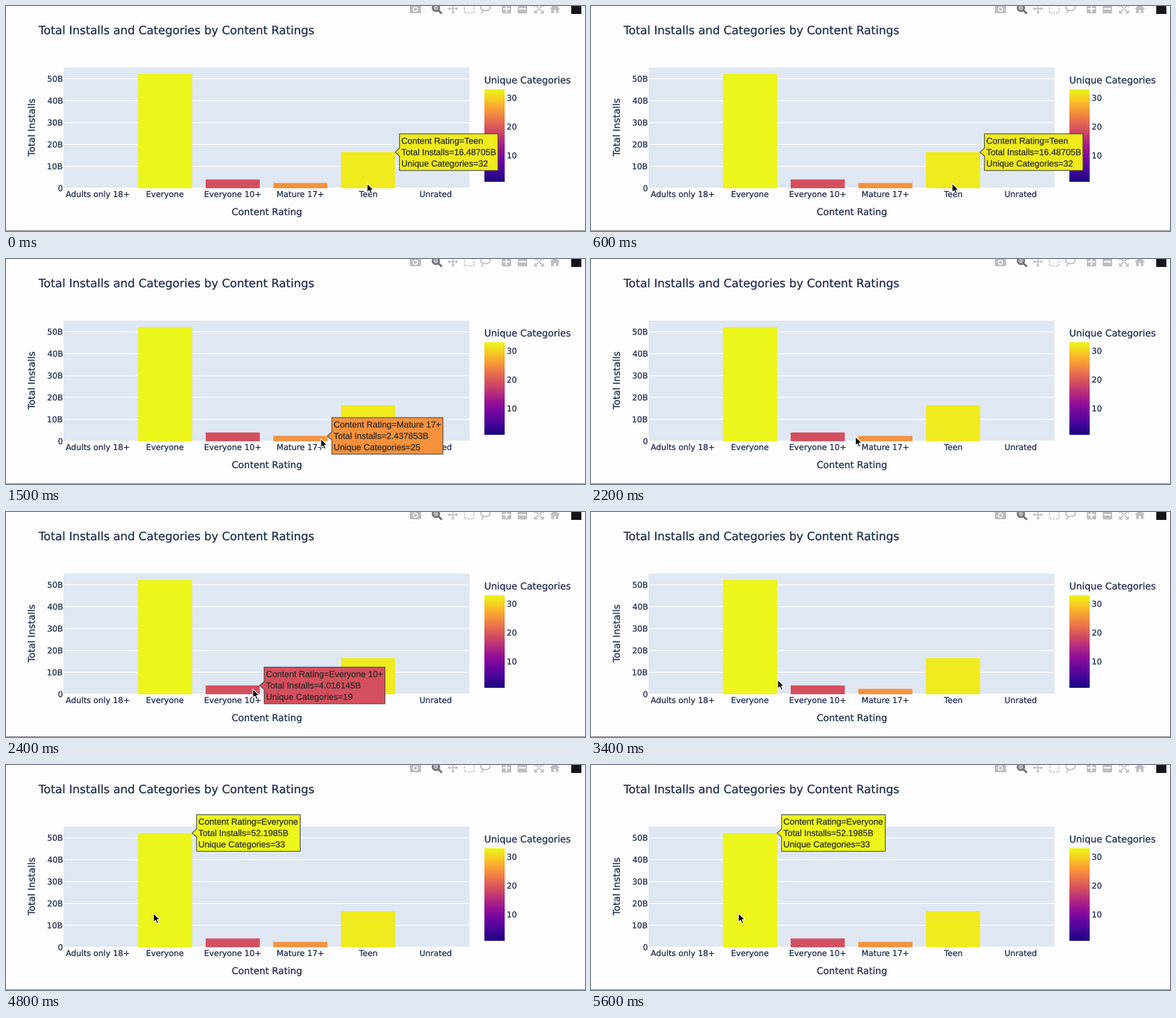
Write a matplotlib script that moves like this. It is 800 px wide and 311 px high and loops after 5.7 s.

```python
import matplotlib.pyplot as plt
import numpy as np
from matplotlib.animation import FuncAnimation
from matplotlib.colors import LinearSegmentedColormap
from matplotlib.patches import (Circle, Ellipse, FancyBboxPatch, PathPatch,
                                Polygon, Rectangle)
from matplotlib.textpath import TextPath
from matplotlib.transforms import Affine2D

W, H, DPI = 800, 311, 64
PT = 72 / DPI  # points per pixel
STEP, FRAMES = 100, 57

BG, PLOT, INK = "#fdfcff", "#dfe7f2", "#1c2848"
ICON, ICON_ON = "#bebec2", "#6f6f74"
X0, X1, Y_TOP, Y_ZERO = 79.6, 640.4, 85.2, 251.9
PX_PER_B = 3.025
SANS, ARIAL = "DejaVu Sans", "Liberation Sans"

plasma = LinearSegmentedColormap.from_list("plasma10", [
    "#1b0580", "#440698", "#6b07a0", "#930f98", "#b52c7f",
    "#d24c61", "#e9704e", "#f89a38", "#f8c822", "#ecf61b"])

# label, installs in billions, text of the value, unique categories
RATINGS = [
    ("Adults only 18+", 0, "", 1),
    ("Everyone", 52.1985, "52.1985B", 33),
    ("Everyone 10+", 4.016145, "4.016145B", 19),
    ("Mature 17+", 2.437853, "2.437853B", 25),
    ("Teen", 16.48705, "16.48705B", 32),
    ("Unrated", 0, "", 1),
]

# pointer stops: ms, x, y
PATH = [(0, 499, 245.4), (700, 499, 245.4), (1200, 472, 240), (1500, 435, 248.5),
        (1800, 435, 248.5), (2400, 341, 244.7), (2800, 341, 244.7),
        (3400, 258, 232), (3900, 203.8, 205), (5700, 203.8, 205)]

fig = plt.figure(figsize=(W / DPI, H / DPI), dpi=DPI, facecolor=BG)
ax = fig.add_axes([0, 0, 1, 1])


def rect(x0, y0, x1, y1, color, z=1):
    return ax.add_patch(Rectangle((x0, y0), x1 - x0, y1 - y0, fc=color, lw=0,
                                  zorder=z, snap=False))


def poly(points, color, z=1, **kw):
    kw.setdefault("lw", 0)
    return ax.add_patch(Polygon(points, closed=True, fc=color, zorder=z, **kw))


def stroke(xs, ys, color=ICON, width=1.5, z=2, **kw):
    return ax.plot(xs, ys, color=color, lw=width * PT, zorder=z, snap=False, **kw)[0]


def label(x, y, s, size, align=0, angle=0, family=SANS, color=INK, z=4):
    """Text with its baseline at y; align 0, 0.5, 1 is left, centre, right.
    Returns the artist and its width in pixels."""
    path = TextPath((0, 0), s, size=size, prop={"family": family})
    box = path.get_extents()
    width = box.x1 + box.x0
    place = Affine2D().translate(-align * width, 0).scale(1, -1).rotate_deg(-angle).translate(x, y)
    artist = ax.add_patch(PathPatch(place.transform_path(path), fc=color, ec=color,
                                    lw=0.22 * PT, zorder=z, snap=False))
    return artist, width


def level(billions):
    return Y_ZERO - billions * PX_PER_B


def shade(categories):
    return plasma((categories - 1) / 32)


def draw_chart():
    rect(X0, Y_TOP, X1, Y_ZERO, PLOT)
    for b in range(0, 60, 10):
        y = level(b)
        stroke([X0, X1], [y, y], "white", 1.7 if b == 0 else 1.1, solid_capstyle="butt")
        label(78.7, y + 4, f"{b}B" if b else "0", 11.1, 1)

    slot = (X1 - X0) / len(RATINGS)
    bars = []
    for i, (name, installs, value, cats) in enumerate(RATINGS):
        cx = X0 + slot * (i + 0.5)
        label(cx, 264, name, 11.1, 0.5)
        if installs:
            left, right, top = cx - 0.4 * slot, cx + 0.4 * slot, level(installs)
            rect(left, top, right, Y_ZERO, shade(cats), z=3)
            bars.append((left, right, top, name, value, cats))

    label(45, 39, "Total Installs and Categories by Content Ratings", 15.88)
    label(360.3, 289, "Content Rating", 12.95, 0.5)
    label(39.8, 168.2, "Total Installs", 12.95, 0.5, angle=90)

    label(660.8, 107, "Unique Categories", 12.95)
    ramp = np.linspace(1, 0, 256)[:, None]
    ax.imshow(ramp, cmap=plasma, extent=(661, 689, 243, 115), aspect="auto", zorder=2)
    for n in (10, 20, 30):
        label(691.8, 115 + (33 - n) * 127.5 / 32 + 4, str(n), 11.1)
    rect(0, 310, W, 311, "#8e8c90")
    return bars


def draw_toolbar():
    # camera
    rect(558, -1, 573.5, 10, ICON)
    ax.add_patch(Circle((565.7, 4.5), 3.6, fc=BG, lw=0, zorder=2))
    ax.add_patch(Circle((565.7, 4.5), 2.2, fc=ICON, lw=0, zorder=3))
    # magnifier
    ax.add_patch(Circle((594, 2.6), 4.6, fc="#b4b4b8", ec=ICON_ON, lw=2.2 * PT, zorder=2))
    stroke([597.6, 601.2], [6.2, 9.6], ICON_ON, 2.8)
    # pan
    cx, cy = 617.5, 3.7
    stroke([cx - 5, cx + 5], [cy, cy])
    stroke([cx, cx], [cy - 5, cy + 5])
    for dx, dy in ((1, 0), (-1, 0), (0, 1), (0, -1)):
        base = np.array([cx + 4.2 * dx, cy + 4.2 * dy])
        side = np.array([-dy, dx]) * 2.6
        poly([base + side, base - side, (cx + 7.2 * dx, cy + 7.2 * dy)], ICON, 2)
    # box select
    stroke([633.5, 646.5, 646.5, 633.5, 633.5], [-2.5, -2.5, 9.5, 9.5, -2.5],
           width=1.5, dashes=(1.6, 1.1), dash_capstyle="butt")
    # lasso
    ax.add_patch(Ellipse((662.5, 2.2), 13, 8.5, fc="none", ec=ICON, lw=1.6 * PT, zorder=2))
    stroke([657.5, 659.5, 658, 657], [4.7, 6.7, 8.5, 10.2])
    # zoom in and out
    for cx in (691.5, 713.5):
        ax.add_patch(FancyBboxPatch((cx - 5.5, -1.7), 11, 11, fc=ICON, lw=0, zorder=2,
                                    boxstyle="round,pad=1,rounding_size=1.5"))
        stroke([cx - 4, cx + 4], [3.8, 3.8], BG, 2, 3)
    stroke([691.5, 691.5], [-0.2, 7.8], BG, 2, 3)
    # autoscale
    cx, cy = 736.5, 3.7
    for sx in (-1, 1):
        for sy in (-1, 1):
            stroke([cx + 1.2 * sx, cx + 5 * sx], [cy + 1.2 * sy, cy + 5 * sy], width=1.6)
            stroke([cx + 2.8 * sx, cx + 6 * sx, cx + 6 * sx],
                   [cy + 6 * sy, cy + 6 * sy, cy + 2.8 * sy], width=1.5)
    # home
    poly([(751, 4), (758.3, -2.7), (765.6, 4)], ICON, 2)
    rect(753.2, 3.6, 763.4, 9.8, ICON, 2)
    rect(757, 5.6, 759.8, 9.8, BG, 3)
    # plain badge
    rect(781, -3, 795, 11, "#17131d", 2)


def make_tip(right, top, name, value, cats):
    """Hover label whose arrow points at the top right corner of a bar."""
    left, half, notch = right + 6.1, 25.3, 5.5
    lines = [f"Content Rating={name}", f"Total Installs={value}", f"Unique Categories={cats}"]
    texts, widths = zip(*(label(left + 2.5, top + (i - 1) * 15.7 + 4.1, s, 12,
                                family=ARIAL, color="#2b2b27", z=9)
                          for i, s in enumerate(lines)))
    end = left + 5.4 + max(widths)
    box = poly([(right, top), (left, top - notch), (left, top - half), (end, top - half),
                (end, top + half), (left, top + half), (left, top + notch)],
               shade(cats), 8, ec="#444444", lw=PT, joinstyle="miter")
    return [box, *texts]


ARROW = np.array([(0, 0), (0, 12.2), (2.8, 9.6), (4.9, 14.2), (7, 13.2), (5, 8.8), (8.8, 8.6)])

bars = draw_chart()
draw_toolbar()
tips = [make_tip(*bar[1:]) for bar in bars]
pointer = poly(ARROW, "black", 12, ec="white", lw=PT)

ax.set_xlim(0, W)
ax.set_ylim(H, 0)
ax.set_axis_off()


def pointer_at(t):
    for (t0, *p0), (t1, *p1) in zip(PATH, PATH[1:]):
        if t <= t1:
            u = (t - t0) / (t1 - t0)
            u = u * u * (3 - 2 * u)
            return np.array(p0) + (np.array(p1) - np.array(p0)) * u


def update(i):
    x, y = pos = pointer_at(i * STEP)
    pointer.set_xy(ARROW + pos)
    for (left, right, top, *_), tip in zip(bars, tips):
        hit = left <= x < right and top <= y <= Y_ZERO
        for artist in tip:
            artist.set_visible(hit)
    return [pointer, *(a for tip in tips for a in tip)]


anim = FuncAnimation(fig, update, frames=FRAMES, init_func=lambda: update(0),
                     interval=STEP, repeat=True, repeat_delay=0)
plt.show()
```
